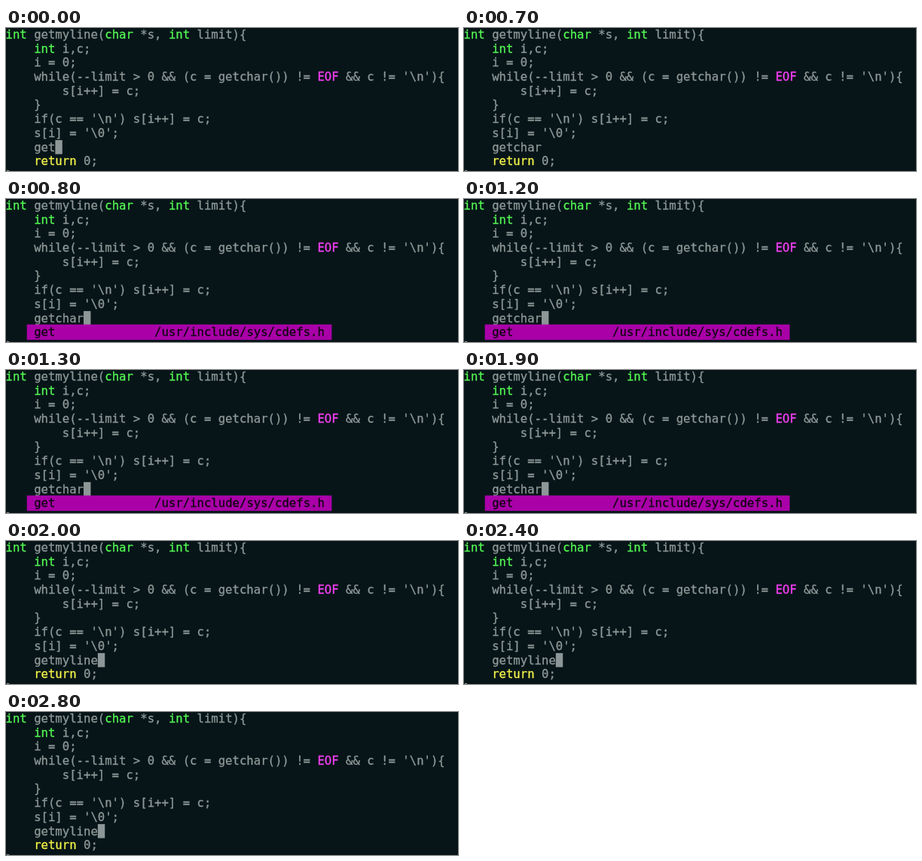
Write an HTML page that moves like this. It is 600 px wide and 190 px high and loops after 2.9 s.

```html
<!DOCTYPE html>
<html lang="en">
<head>
<meta charset="utf-8">
<title>Code completion</title>
<style>
html, body { margin: 0; width: 100%; height: 100%; overflow: hidden; background: #071518; }
svg { display: block; width: 600px; height: 190px; }
text { font: 15.63px "DejaVu Sans Mono", monospace; white-space: pre; color: #8f9999; }
text, tspan { fill: currentColor; stroke: currentColor; stroke-width: 0.3px; }
.type { color: #55fa55; }
.const { color: #f93ff9; }
.key { color: #f6f64a; }
.menu text { color: #100510; }
</style>
</head>
<body>
<svg id="stage" viewBox="0 0 600 190"></svg>
<script>
const NS = "http://www.w3.org/2000/svg";
const LOOP = 2900, X0 = -0.5, Y0 = -0.7, CW = 9.41, RH = 18.7, BASE = 14.6;
const stage = document.getElementById("stage");
const colX = c => X0 + c * CW;
const rowY = r => Y0 + r * RH;

function add(parent, tag, attrs = {}, content = "") {
  const el = document.createElementNS(NS, tag);
  for (const k in attrs) el.setAttribute(k, attrs[k]);
  el.textContent = content;
  return parent.appendChild(el);
}

const block = (parent, col, row, cols, fill, pad = 0) => add(parent, "rect",
  { x: colX(col), y: rowY(row) - pad, width: cols * CW, height: RH + 2 * pad, fill });

const classes = { int: "type", char: "type", EOF: "const", return: "key" };

function line(parent, col, row, str) {
  const el = add(parent, "text", { x: colX(col), y: rowY(row) + BASE });
  for (const part of str.split(/\b(int|char|EOF|return)\b/))
    if (part) add(el, "tspan", { class: classes[part] || "" }, part);
  return el;
}

add(stage, "rect", { width: 600, height: 190, fill: "#071518" });

const code = [
  [0, "int getmyline(char *s, int limit){"],
  [4, "int i,c;"],
  [4, "i = 0;"],
  [4, "while(--limit > 0 && (c = getchar()) != EOF && c != '\\n'){"],
  [8, "s[i++] = c;"],
  [4, "}"],
  [4, "if(c == '\\n') s[i++] = c;"],
  [4, "s[i] = '\\0';"],
  [4, "get"],
  [4, "return 0;"],
  [0, "}"]
];
const rows = code.map(([col, str], r) => line(stage, col, r, str));
const typed = rows[8];
const cursor = block(stage, 7, 8, 1, "#8d9797");

const menu = add(stage, "g", { class: "menu" });
block(menu, 3, 9, 43, "#a900a8", 0.9);
line(menu, 4, 9, "get");
line(menu, 21, 9, "/usr/include/sys/cdefs.h");

// Start time, completed word, cursor shown, menu shown
const states = [
  [0, "get", true, false],
  [700, "getchar", false, false],
  [800, "getchar", true, true],
  [2000, "getmyline", true, false]
];

function draw(ms) {
  const t = ms % LOOP;
  const [, word, caret, open] = states.filter(s => s[0] <= t).pop();
  typed.textContent = word;
  cursor.setAttribute("x", colX(4 + word.length));
  cursor.setAttribute("visibility", caret ? "visible" : "hidden");
  menu.setAttribute("visibility", open ? "visible" : "hidden");
}

const start = performance.now();
function tick() {
  draw(performance.now() - start);
  requestAnimationFrame(tick);
}
tick();
</script>
</body>
</html>
```
